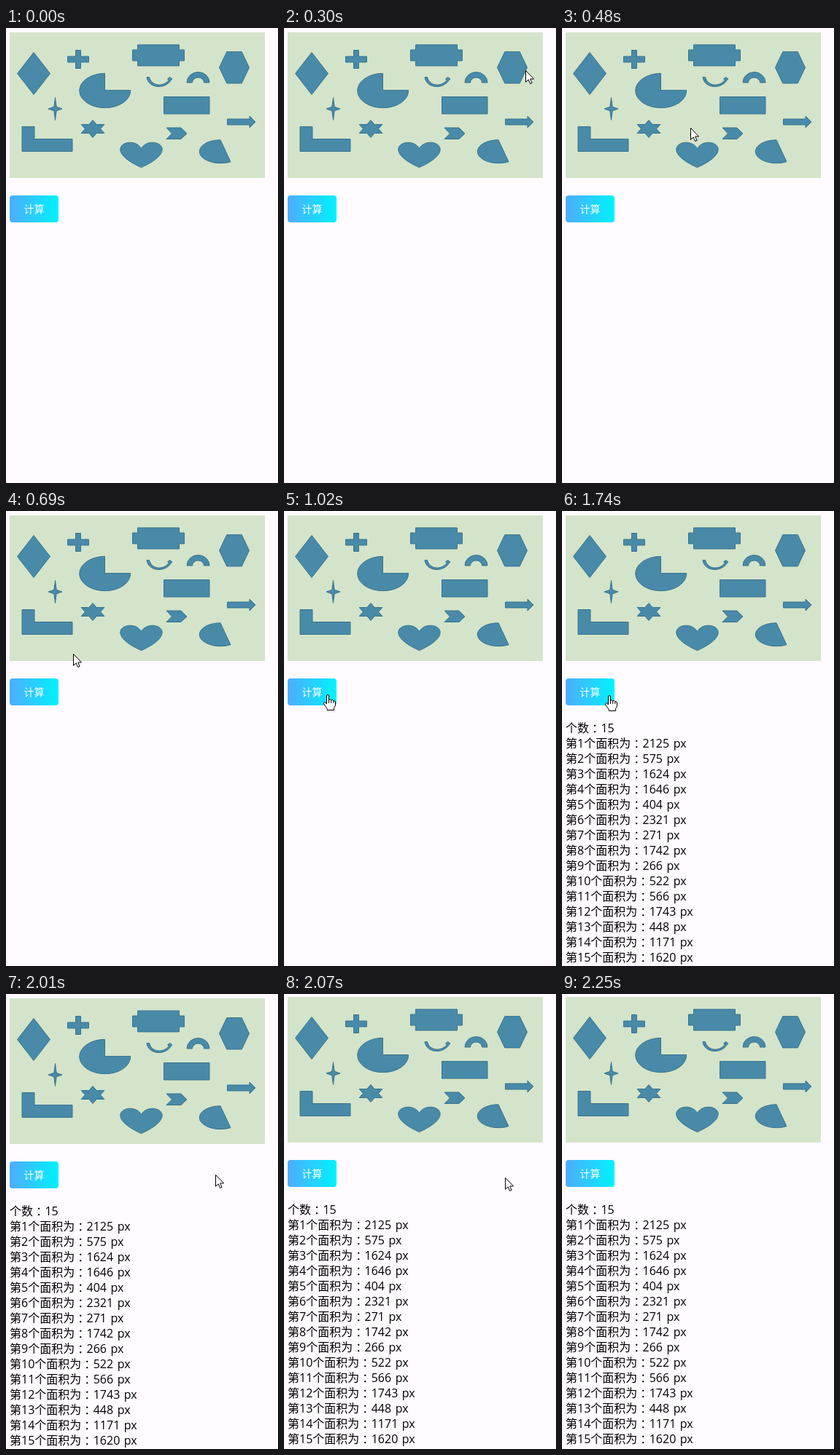
Animation of 373 by 625 pixels, one loop 2850 ms. Source, as an HTML page:

```html
<!DOCTYPE html>
<html lang="zh-CN">
<head>
<meta charset="utf-8">
<style>
  html, body { margin: 0; width: 100%; height: 100%; overflow: hidden; background: #fffbff; }
  svg { display: block; width: 373px; height: 625px; }
  text { font-family: "Open Sans", "Noto Sans CJK SC", "Noto Sans CJK", sans-serif; }
  #results { font-size: 16px; word-spacing: 1.4px; fill: #000; }
  #label { font-size: 14px; fill: #fff; text-anchor: middle; }
  #shapes { fill: #488aa8; stroke: #39748f; stroke-width: 1; }
  .cursor { fill: #fff; stroke: #000; stroke-width: 1; stroke-linejoin: round; }
</style>
</head>
<body>
<svg viewBox="0 0 373 625">
  <defs>
    <linearGradient id="blue">
      <stop offset="0" stop-color="#4facfe"/>
      <stop offset="1" stop-color="#00f2fe"/>
    </linearGradient>
  </defs>
  <rect width="373" height="625" fill="#fffbff"/>
  <g id="page">
    <rect x="5" y="6" width="350" height="200" fill="#d4e4ca"/>
    <g id="shapes"></g>
    <rect x="5" y="230" width="67" height="37" rx="4" fill="url(#blue)"/>
    <text id="label" x="38.5" y="254">计算</text>
    <g id="results"></g>
  </g>
  <path id="arrow" class="cursor" d="M.5 .5V16.3L4.2 12.9L6.6 18.5L9.1 17.4L6.7 12H11.6Z"/>
  <path id="hand" class="cursor" d="M-1.5 13V2Q-1.5 .5 0 .5T1.5 2V7.5Q3.5 6 4.7 7.8Q6.6 6.8 7.8 8.6Q10.5 8.2 10.5 11V15L8.6 18.5V21.5H-.8V19.5L-4.9 13.8Q-6.2 11.2 -4.4 10.6Q-3 10.4 -1.5 13M1.5 7.5V12M4.7 8V12M7.8 8.8V12"/>
</svg>
<script>
  const LOOP = 2850, STEP = 30;
  const ENTER = 270, SHOW = 1350, SCROLL = 2070, LEAVE = 2250;
  const areas = [2125, 575, 1624, 1646, 404, 2321, 271, 1742, 266, 522, 566, 1743, 448, 1171, 1620];

  // time, x, y of the pointer's hot spot
  const keys = [
    [270, 358, 44], [480, 176, 137], [690, 92, 196], [780, 74, 226], [1020, 60, 252],
    [1650, 60, 252], [1860, 85, 254], [2010, 287, 248], [2070, 303, 252], [2220, 362, 213]
  ];

  const $ = id => document.getElementById(id);
  const page = $("page"), results = $("results"), arrow = $("arrow"), hand = $("hand");

  function add(parent, tag, attrs, content = "") {
    const el = document.createElementNS("http://www.w3.org/2000/svg", tag);
    for (const name in attrs) el.setAttribute(name, attrs[name]);
    el.textContent = content;
    parent.append(el);
    return el;
  }

  const poly = points => `M${points.join("L")}Z`;

  // n points on an ellipse, alternating with inner points when inner < 1
  function star(cx, cy, rx, ry, n, turn = 0, inner = 1) {
    const count = inner < 1 ? 2 * n : n;
    return poly(Array.from({ length: count }, (_, i) => {
      const a = turn + i * 2 * Math.PI / count;
      const r = inner < 1 && i % 2 ? inner : 1;
      return [cx + rx * r * Math.cos(a), cy + ry * r * Math.sin(a)];
    }));
  }

  // rectangle with its four corners cut out
  function notched(cx, cy, w, h, nx, ny) {
    const x = w / 2, y = h / 2, ix = x - nx, iy = y - ny;
    const half = [[-x, iy], [-x, -iy], [-ix, -iy], [-ix, -y], [ix, -y], [ix, -iy]];
    const ring = [...half, ...half.map(([a, b]) => [-a, -b])];
    return poly(ring.map(([a, b]) => [cx + a, cy + b]));
  }

  function heart(cx, top, w, h) {
    const at = (dx, dy) => `${cx + w * dx / 48} ${top + h * dy}`;
    return `M${at(0, .25)}C${at(10, -1 / 3)} ${at(49, .25)} ${at(0, 1)}` +
           `C${at(-49, .25)} ${at(-10, -1 / 3)} ${at(0, .25)}Z`;
  }

  const shapes = [
    star(38, 62.5, 22.5, 29, 4),
    star(313, 54.3, 20.5, 25, 6),
    star(67.5, 111, 9.5, 15.5, 4, 0, .25),
    star(119, 138.5, 18.3, 12, 6, -Math.PI / 2, .577),
    notched(99, 43, 29, 25, 11, 8.5),
    notched(209, 37.5, 71, 29, 7, 7),
    heart(185.5, 156.8, 57, 34.8),
    "M135.5 62.3A35 23.7 0 1 0 170.7 85.5H135.5Z",
    "M294 153.7A28.8 16 0 1 0 308 183.7Z",
    "M248 75A15.5 14.5 0 0 1 279 75H271.5A8 7 0 0 0 255.5 75Z",
    "M193 67.5C195 83 218 85 226.5 71.5L228 70L224.5 67.5L221.5 70L223.5 71C217 81 200 81 196.5 67.5Z",
    "M216.5 94.5H279V118H216.5Z",
    "M303.5 125H334V121L342 129L334 137V133H303.5Z",
    "M22 135.5H39V152.5H91V169.5H22Z",
    "M220 137H240L248 145L240 152.5H220L227.5 145Z"
  ];
  shapes.forEach(d => add($("shapes"), "path", { d }));

  // the colon sits in the middle of its full-width cell
  function addLine(label, value, row) {
    const text = add(results, "text", { x: 5, y: 304 + 21 * row }, label);
    add(text, "tspan", { dx: 4 }, "：");
    add(text, "tspan", { dx: -3.6 }, value);
  }
  addLine("个数", areas.length, 0);
  areas.forEach((area, i) => addLine(`第${i + 1}个面积为`, `${area} px`, i + 1));

  const slope = (i, c) => i < 0 || i > keys.length - 2 ? 0
    : (keys[i + 1][c] - keys[i][c]) / (keys[i + 1][0] - keys[i][0]);

  // monotone tangent at key i: harmonic mean of the slopes beside it
  function tangent(i, c) {
    if (i === 0) return slope(0, c);
    if (i === keys.length - 1) return slope(i - 1, c);
    const a = slope(i - 1, c), b = slope(i, c);
    return a * b > 0 ? 2 * a * b / (a + b) : 0;
  }

  function pointerAt(t) {
    const i = Math.max(1, keys.findIndex(k => k[0] >= t)) - 1;
    const span = keys[i + 1][0] - keys[i][0], s = (t - keys[i][0]) / span;
    const ease = s * s * (3 - 2 * s);
    return [1, 2].map(c => {
      const from = keys[i][c], to = keys[i + 1][c];
      const bend = s * (1 - s) * ((1 - s) * tangent(i, c) - s * tangent(i + 1, c));
      return Math.round(from + (to - from) * ease + span * bend);
    });
  }

  const show = (el, on) => el.setAttribute("visibility", on ? "visible" : "hidden");

  function draw(time) {
    const t = Math.floor((time % LOOP) / STEP) * STEP;
    show(results, t >= SHOW);
    page.setAttribute("transform", `translate(0 ${t >= SCROLL ? -2 : 0})`);

    const visible = t >= ENTER && t < LEAVE;
    const [x, y] = visible ? pointerAt(t) : [0, 0];
    const onButton = x >= 5 && x < 72 && y >= 230 && y < 267;
    show(arrow, visible && !onButton);
    show(hand, visible && onButton);
    (onButton ? hand : arrow).setAttribute("transform", `translate(${x} ${y})`);
  }

  const start = performance.now();
  function tick() {
    draw(performance.now() - start);
    requestAnimationFrame(tick);
  }
  tick();
</script>
</body>
</html>
```
